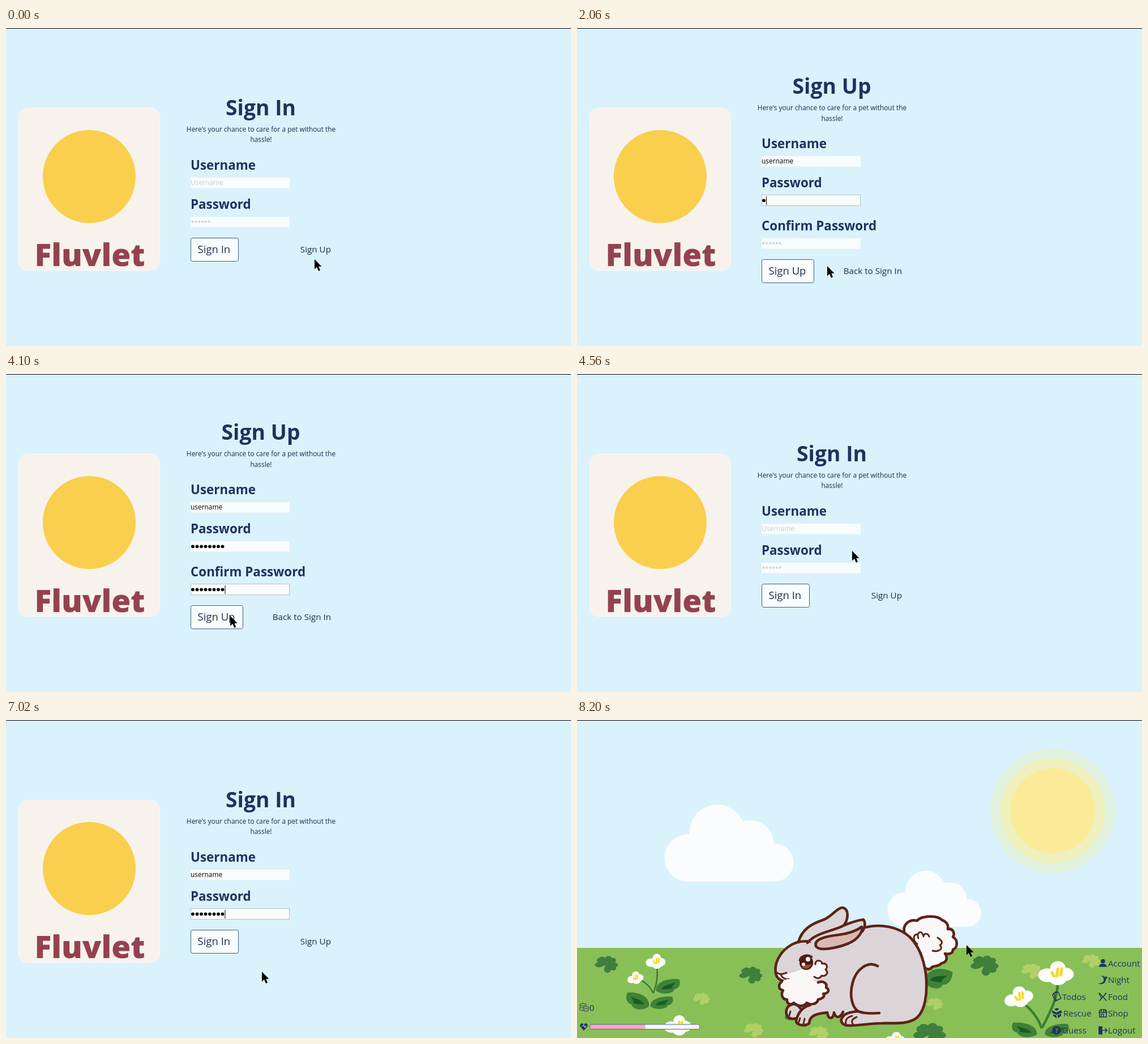
Recreate the animation shown at these times as an HTML page. Size 998 px wide and 561 px high, loop 8260 ms.

```html
<!DOCTYPE html>
<html lang="en">
<head>
<meta charset="utf-8">
<title>Pet care sign in</title>
<style>
  html, body { margin: 0; width: 100%; height: 100%; overflow: hidden; background: #daf2fb; }
  svg { display: block; width: 998px; height: 561px; font-family: "Open Sans", "Noto Sans", sans-serif; }
  .head { font-weight: 650; fill: #1f3260; }
  .body { font-weight: 500; fill: #1d2b4f; }
  .line { fill: none; stroke: #5c2318; stroke-width: 4.6; stroke-linecap: round; stroke-linejoin: round; }
  .thin { stroke-width: 3; }
  .fur { fill: #dcd5d7; }
  .white { fill: #faf8f7; }
  .ear { fill: #d9b9b3; }
  .stem { fill: none; stroke: #3c7d35; stroke-linecap: round; }
  .icon { fill: #1f3260; stroke: #1f3260; stroke-width: 0; }
  .open { fill: none; stroke-width: 1.5; stroke-linecap: round; stroke-linejoin: round; }
</style>
</head>
<body>
<svg id="stage" viewBox="0 0 998 561" xmlns="http://www.w3.org/2000/svg">
  <defs>
    <g id="clover"><g transform="scale(1.12 .82)" id="leaves"></g></g>
    <g id="flower">
      <g fill="#fdfdfb">
        <ellipse cx="-9" cy="2" rx="9.5" ry="7.5"/><ellipse cx="9" cy="1" rx="9.5" ry="7.5"/>
        <ellipse cx="2" cy="-6" rx="8" ry="7.5"/><ellipse cx="2" cy="6" rx="9" ry="7"/>
      </g>
      <path d="M-4 -1L-2 3M2 -5L1 3M6 -5L5 2" fill="none" stroke="#f6d92c" stroke-width="3" stroke-linecap="round"/>
    </g>
    <g id="leaf">
      <path d="M-21 8C-24 -5 -6 -15 19 -13C24 -3 18 4 11 5C10 13 -10 16 -21 8Z" fill="#3f8139"/>
      <path d="M-12 5C-10 0 -4 -2 3 -4L13 -7L7 0L8 3L-4 5Z" fill="#14601f"/>
    </g>
    <path id="cloud" fill="#fafcfe" d="M192 285A42 42 0 0 1 192 201.500Q196 201 199 202A49 49 0 0 1 293 179A42 42 0 0 1 348 218A33.500 33.500 0 0 1 350 285Z"/>
  </defs>

  <rect width="998" height="561" fill="#daf2fb"/>

  <g id="login">
    <rect x="22.500" y="141.500" width="249" height="286" rx="15" fill="#f7f2ec" stroke="#fcfaf7"/>
    <circle cx="147" cy="262" r="82" fill="#f9cf4d"/>
    <text x="148" y="420" font-size="55" font-weight="800" fill="#94424f" text-anchor="middle">Fluvlet</text>
    <g id="form"></g>
  </g>

  <g id="scene">
    <circle cx="840" cy="160" r="110" fill="#e1f2df"/>
    <circle cx="840" cy="160" r="92.500" fill="#eff0bd"/>
    <circle cx="840" cy="160" r="75" fill="#fbeb98"/>
    <use href="#cloud"/>
    <use href="#cloud" transform="translate(436 157.600) scale(.7265)"/>
    <rect y="402" width="998" height="159" fill="#88c057"/>
    <g id="meadow"></g>

    <g id="rabbit">
      <path class="line white" d="M579 378C573 360 588 351 601 354C606 346 635 343 645 353C655 357 656 363 655 369C664 367 668 376 664 383C673 387 673 402 664 405C664 412 657 414 650 412C656 420 652 428 644 429C638 436 630 433 627 436C624 441 619 440 616 438"/>
      <path class="line thin" d="M601 395C592 388 594 377 602 378M603 385C599 375 608 370 611 379M612 382C613 375 620 376 622 382M637 384C645 389 647 394 641 397C648 403 639 410 628 407"/>
      <path class="line fur" d="M391 392C397 370 413 360 434 353C449 348 459 331 469 331C481 333 480 352 470 364"/>
      <path class="fur" d="M391 392L470 364L508 366L520 520L469 518C463 527 457 525 454 516C453 528 444 530 442 516L412 524L392 512L368 468L354 440Z"/>
      <path class="line fur" d="M508 366C535 359 567 364 588 383C605 400 613 426 616 447C620 482 615 515 598 527C580 538 558 534 538 535C518 535 501 539 482 539C467 539 464 531 469 524C475 516 485 515 497 514"/>
      <path class="line" d="M470 515C465 526 457 527 454 516C453 528 444 530 442 516C429 516 418 518 412 524"/>
      <path class="line" d="M531 434C514 424 493 440 487 463C480 487 487 508 497 514C507 518 520 518 534 517"/>
      <path class="line thin" d="M475 535C473 528 480 523 486 522M487 536C483 530 489 526 494 524"/>

      <path class="fur" d="M412 391C382 384 361 406 353 426C349 442 350 450 357 455L372 462H436L448 395Z"/>
      <path class="white" d="M354 448C376 451 389 441 404 439L421 431C421 422 432 423 433 430C441 428 444 436 439 440C446 446 439 453 432 451C428 459 416 456 411 462H371C363 460 355 456 354 448Z"/>
      <path class="line" d="M412 391C381 386 359 408 352 429C349 443 350 451 356 456C361 461 368 461 372 462"/>
      <path class="line thin" d="M351 444C358 451 363 448 370 446M360 448C361 455 369 458 374 457M421 431C421 422 432 423 433 430C441 428 444 436 439 440C446 446 439 453 432 451C429 457 423 456 419 453"/>
      <path class="white" d="M362 461C355 467 355 475 364 477C358 487 366 494 371 493C370 502 379 503 383 499C393 508 402 504 406 499C416 505 425 499 426 493C437 491 438 485 435 483C446 482 446 475 440 472C443 463 433 460 426 463L410 457H371Z"/>
      <path class="line" d="M362 461C355 467 355 475 364 477C358 487 366 494 371 493C370 502 379 503 383 499C393 508 402 504 406 499C416 505 425 499 426 493C437 491 438 485 435 483C446 482 446 475 440 472C443 463 433 460 426 463"/>

      <path class="line fur" d="M388 526C375 530 368 522 370 512C371 505 377 502 383 501C392 503 394 508 397 512"/>
      <path class="fur" d="M412 503C397 506 389 519 387 532C390 540 405 540 410 535C411 522 421 518 442 516V503Z"/>
      <path class="line" d="M412 503C397 506 389 519 387 532C390 540 405 540 410 535C411 522 421 518 442 516"/>
      <path class="line thin" d="M394 526L391 535M402 527L400 536M377 514L375 521"/>

      <path class="line fur" d="M407 393C422 375 451 373 470 363C484 357 498 353 506 352C511 360 508 367 504 373"/>
      <path class="line ear" d="M422 399C418 387 437 382 462 379C480 377 493 372 503 365C506 373 496 387 480 394C460 402 428 409 422 399Z"/>
      <ellipse cx="405" cy="428" rx="12" ry="13" fill="#4b1a12"/>
      <path d="M397 435C402 442 413 439 414 430C409 434 404 429 397 435Z" fill="#91513f"/>
      <circle cx="408" cy="422" r="4" fill="#fff"/>
      <circle cx="400" cy="431" r="3" fill="#fff"/>
      <path class="line thin" d="M393 424C395 415 407 412 415 418"/>
    </g>

    <g class="icon open" style="stroke:#50685d">
      <ellipse cx="11" cy="502" rx="5.500" ry="2"/><path d="M5.500 502V511C8 513 12 513 13 512M5.500 506C8 508 10 508 12 507"/>
      <ellipse cx="16" cy="507" rx="4.500" ry="2"/><path d="M11.500 507V512C14 514.500 19 514 20.500 512V507"/>
    </g>
    <path class="icon" d="M12 548L6 541C4 536 9 533 12 537C15 533 21 536 18 541Z"/>
    <path d="M8 540H11L12 537L14 543L15 540H17" fill="none" stroke="#b9d79c"/>
    <rect x="22.500" y="537" width="194" height="8.500" rx="3" fill="#f9f6f7"/>
    <path d="M25 537H120.500V545.500H25Q22.500 545.500 22.500 543V539.500Q22.500 537 25 537Z" fill="#f4a8c5"/>
    <rect x="22.500" y="537" width="194" height="8.500" rx="3" fill="none" stroke="#546887"/>

    <g class="icon">
      <circle cx="929" cy="425.500" r="3.800"/><path d="M922 435.500C922 428 936 428 936 435.500Z"/>
      <path d="M926 451C934 456 931 466 921 464C926 469 935 464 934 457C933 453 930 451 926 451Z"/>
      <path d="M934.500 451L935.500 453.500L938 454.500L935.500 455.500L934.500 458L933.500 455.500L931 454.500L933.500 453.500Z"/>
      <path class="open" d="M923 482L935 495M935 482L923 495M922 482L926 490M934 482L930 488"/>
      <path class="open" d="M923 517V524H935V517M922 516L924 511H934L936 516ZM926 512V516M930 512V516M933 512V516M926 524V519H930V524"/>
      <path class="open" d="M927 541H922V554H927M929 547.500H936M933 544L936.500 547.500L933 551"/><path d="M922 541H928V555L922 553Z"/>
      <path class="open" d="M842 482L850 480L855 491L847 495ZM842 482L840 485L845 496L847 495M844 480L850 480"/>
      <path d="M839 512L847 516L855 512L857 516L848 520L840 517ZM841 519L847 521V526L841 522ZM849 521L855 518V522L849 526Z"/>
      <path d="M843 510L848 508L852 510L847 513Z"/>
      <circle cx="847" cy="547.500" r="7.500"/>
    </g>
    <text x="847" y="552" font-size="11" font-weight="700" fill="#6f9d58" text-anchor="middle">?</text>
    <g id="menu" font-size="15" fill="#1f3260"></g>
  </g>

  <path id="cursor" d="M0 0V17.500L4 13.800L7 20.700L10 19.400L7.200 12.700H12.500Z"/>
  <rect width="998" height="1" fill="#000"/>
</svg>
<script>
const LOOP = 8260;
const $ = id => document.getElementById(id);
const text = (x, y, size, str, extra = 'class="body"') =>
  `<text x="${x}" y="${y}" font-size="${size}" ${extra}>${str}</text>`;
const use = (id, x, y, sx = 1, sy = sx, turn = 0) =>
  `<use href="#${id}" transform="translate(${x} ${y}) rotate(${turn}) scale(${sx} ${sy})"/>`;

// Meadow
const heart = 'M0 1C-4 -4 -11 -6 -10 -13C-9 -19 -2 -18 0 -14C2 -18 9 -19 10 -13C11 -6 4 -4 0 1Z';
$('leaves').innerHTML = [-72, 72, -8, 150]
  .map(a => `<path d="${heart}" transform="rotate(${a})"/>`).join('');
const clovers = (color, list) =>
  `<g fill="${color}">${list.map(([x, y, s]) => use('clover', x, y, s)).join('')}</g>`;
const stem = (d, w) => `<path class="stem" d="${d}" stroke-width="${w}"/>`;

$('meadow').innerHTML =
  clovers('#3e7f3d', [[52, 431, 1], [307, 450, 1], [720, 433, 1.2], [623, 555, 1.4]]) +
  clovers('#b2cf68', [[220, 492, .72], [312, 547, .85], [427, 553, .85], [632, 501, .72], [803, 443, .9], [908, 425, .8]]) +
  stem('M134 481C128 468 120 463 110 457M135 481C143 462 143 446 140 430', 2.6) +
  use('leaf', 161, 470) + use('leaf', 107, 496, -.95, 1.15) + use('leaf', 150, 499, .95, .85) +
  use('flower', 103, 455, .78, .85, -10) + use('flower', 139, 426, .95, 1) +
  use('flower', 178, 539, 1.3, 1.35) +
  use('leaf', 638, 456, 1.05, 1.5, 20) + use('leaf', 380, 522, .6) +
  use('flower', 562, 563, .95) +
  stem('M820 542C814 524 800 508 786 498M822 542C838 512 850 486 849 462', 4.4) +
  use('leaf', 790, 547, -1.05, 1) + use('leaf', 848, 548, 1, .9) +
  use('flower', 780, 489, 1.4, 1.4, -12) + use('flower', 846, 447, 1.7, 1.6);

$('menu').innerHTML = [
  ['Account', 938, 434.5], ['Night', 938, 464], ['Todos', 857, 494], ['Food', 938, 494],
  ['Rescue', 859, 523], ['Shop', 938, 523], ['Guess', 857, 553], ['Logout', 938, 553], ['0', 22, 513]
].map(([s, x, y]) => text(x, y, 15, s, '')).join('');

// Forms
const typed = (t, start, step) => Math.max(0, Math.min(8, Math.floor((t - start) / step) + 1));

const PAGES = {
  up: {
    title: 'Sign Up', top: 116, labels: ['Username', 'Password', 'Confirm Password'],
    boxes: [226, 295, 371], button: 408, wide: 92, link: 'Back to Sign In',
    keys: [[1080, 105], [2060, 95], [2960, 105]], focus: [480, 1980, 2900]
  },
  in: {
    title: 'Sign In', top: 153.5, labels: ['Username', 'Password'],
    boxes: [264, 333], button: 370, wide: 84, link: 'Sign Up',
    keys: [[4960, 80], [5950, 130]], focus: [4860, 5640]
  }
};

function field(page, i, t, focused) {
  const y = page.boxes[i], [start, step] = page.keys[i];
  const n = typed(t, start, step), secret = i > 0;
  let out = focused
    ? `<rect x="326.5" y="${y - .5}" width="174" height="19" fill="#fafcfb" stroke="#b7c0c6"/>`
    : `<rect x="326" y="${y}" width="175" height="18.5" fill="#f9fcfc"/>`;
  const end = 326.5 + n * 7.5;
  if (!n) out += secret
    ? text(326.5, y + 14, 10.6, '******', 'fill="#b9c1c8"')
    : text(326, y + 13, 12, 'Username', 'fill="#c5ccd0"');
  else if (secret)
    for (let k = 0; k < n; k++) out += `<circle cx="${330 + k * 7.5}" cy="${y + 9.3}" r="2.9"/>`;
  else out += text(326, y + 13, 11.9, 'username'.slice(0, n), 'id="entry" font-weight="500" fill="#050505"');

  const lastKey = n ? start + (n - 1) * step : page.focus[i];
  const caretOn = focused && (t - lastKey) % 1000 < 500;
  return out + (caretOn ? `<rect class="caret" x="${end}" y="${y + 2}" width="1" height="15"/>` : '');
}

function drawForm(page, t) {
  const { top, button, wide } = page;
  const active = page.focus.filter(f => t >= f).length - 1;
  const mid = 'class="body" text-anchor="middle"';
  $('form').innerHTML =
    text(450, top, 37.3, page.title, 'class="head" text-anchor="middle"') +
    text(450.5, top + 29, 11.9, "Here's your chance to care for a pet without the", mid) +
    text(450.5, top + 47.5, 11.9, 'hassle!', mid) +
    page.labels.map((s, i) =>
      text(326, page.boxes[i] - 14, 22.4, s, 'class="head"') + field(page, i, t, i === active)).join('') +
    `<rect x="326.500" y="${button + .5}" width="${wide}" height="41" rx="3" fill="#fafdfd" stroke="#405b86"/>` +
    text(338.5, button + 26.5, 18.5, page.title) +
    text(574, button + 25.5, 15.2, page.link, 'class="body" text-anchor="end"');
  const entry = $('entry'), caret = document.querySelector('.caret');
  if (entry && caret && active === 0) caret.setAttribute('x', 326.5 + entry.getComputedTextLength());
}

// Pointer stops: time, x, y
const STOPS = [
  [0, 545, 408], [180, 546, 391], [280, 546, 390], [480, 440, 236], [760, 446, 240], [1000, 450, 268],
  [1600, 442, 420], [3960, 442, 420], [4140, 390, 428], [4280, 390, 428], [4560, 486, 312],
  [4820, 440, 273], [4900, 440, 273], [5300, 453, 445], [6400, 453, 445], [6600, 452, 444],
  [7080, 452, 444], [7320, 392, 394], [7540, 392, 394], [8140, 688, 397], [8260, 688, 397]
];
const ease = p => p * p * (3 - 2 * p);

function pointer(t) {
  const i = STOPS.findIndex(s => s[0] > t);
  const [t0, x0, y0] = STOPS[i - 1], [t1, x1, y1] = STOPS[i];
  const p = ease((t - t0) / (t1 - t0));
  return [x0 + (x1 - x0) * p, y0 + (y1 - y0) * p];
}

function render(t) {
  const outside = t >= 7480;
  $('scene').style.display = outside ? '' : 'none';
  $('login').style.display = outside ? 'none' : '';
  if (outside) {
    const k = .006 * (1 - Math.cos((t - 8200) / 700 * 2 * Math.PI));
    $('rabbit').setAttribute('transform', `translate(510 540) scale(${1 + k} ${1 - k}) translate(-510 -540)`);
  } else {
    drawForm(t >= 280 && t < 4260 ? PAGES.up : PAGES.in, t);
  }
  $('cursor').setAttribute('transform', `translate(${pointer(t)})`);
}

const began = performance.now();
function tick() {
  render((performance.now() - began) % LOOP);
  requestAnimationFrame(tick);
}
tick();
</script>
</body>
</html>
```
